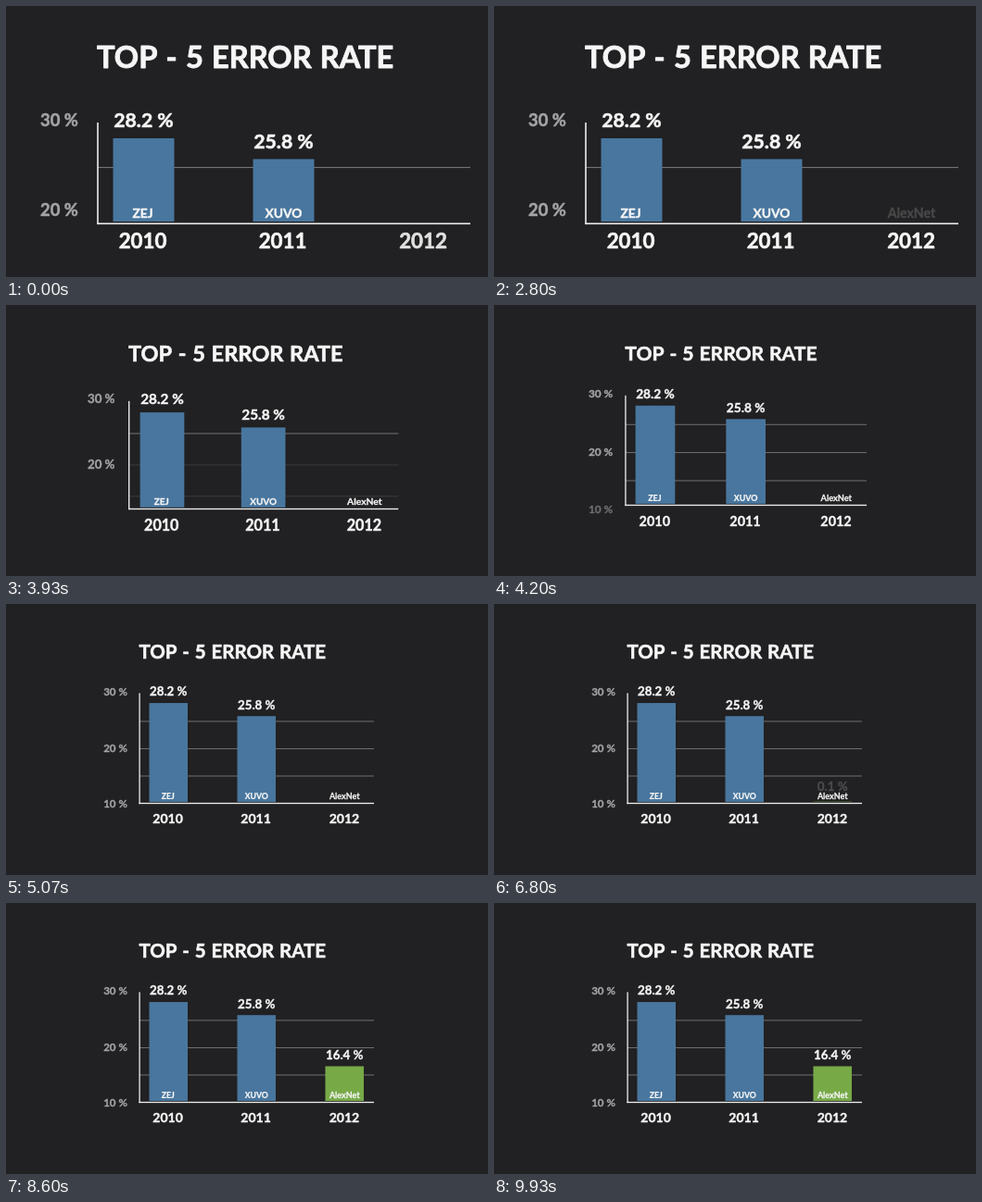
An HTML page with a canvas for the animation above (9990 ms loop, 520 by 293 pixels).

```html
<!DOCTYPE html>
<html lang="en">
<head>
<meta charset="utf-8">
<title>Top-5 error rate</title>
<style>
  html, body { margin: 0; width: 100%; height: 100%; overflow: hidden; background: #212022; }
  canvas { display: block; width: 520px; height: 293px; }
</style>
</head>
<body>
<canvas id="stage"></canvas>
<script>
const W = 520, H = 293, LOOP = 9990;
const BACK = '#212022', WHITE = '#f6f6f6', GREY = '#a4a4a6', LINE = '#7e7d80', BLUE = '#48769e', GREEN = '#77aa47';
const END_SCALE = 0.629, FIX_X = 220.6, FIX_Y = 46.1;

const canvas = document.getElementById('stage');
const ctx = canvas.getContext('2d');
const dpr = window.devicePixelRatio || 1;
canvas.width = Math.round(W * dpr);
canvas.height = Math.round(H * dpr);

const lerp = (a, b, p) => a + (b - a) * p;
const ramp = (t, a, b) => Math.min(1, Math.max(0, (t - a) / (b - a)));
const smooth = p => p * p * (3 - 2 * p);

// Cubic bezier easing with handles (x1, 0) and (x2, 1).
function bezier(x, x1, x2) {
  let lo = 0, hi = 1;
  for (let i = 0; i < 24; i++) {
    const u = (lo + hi) / 2, v = 1 - u;
    if (3 * x1 * u * v * v + 3 * x2 * u * u * v + u * u * u < x) lo = u;
    else hi = u;
  }
  return smooth(lo);
}

const blend = (from, to, p) => '#' + [1, 3, 5].map(i => {
  const [a, b] = [from, to].map(c => parseInt(c.slice(i, i + 2), 16));
  return Math.round(lerp(a, b, p)).toString(16).padStart(2, '0');
}).join('');

// Bold text, thickened by a thin outline; fading mixes it with the backdrop.
function text(str, x, y, size, color = WHITE, alpha = 1) {
  if (alpha <= 0) return;
  ctx.font = `700 ${size}px Lato, "Open Sans", sans-serif`;
  ctx.fillStyle = ctx.strokeStyle = blend(BACK, color, alpha);
  ctx.lineWidth = size * 0.028;
  ctx.lineJoin = 'round';
  ctx.fillText(str, x, y + size * 0.36);
  ctx.strokeText(str, x, y + size * 0.36);
}

function box(x1, y1, x2, y2, color, alpha = 1) {
  ctx.globalAlpha = alpha;
  ctx.fillStyle = color;
  ctx.fillRect(x1, y1, x2 - x1, y2 - y1);
  ctx.globalAlpha = 1;
}

function draw(t) {
  const zoom = bezier(ramp(t, 3560, 4500), 0.32, 0.05);
  const s = lerp(1, END_SCALE, zoom);
  const X = x => FIX_X + s * (x - FIX_X);
  const Y = y => FIX_Y + s * (y - FIX_Y);

  // The base of the chart slides on its own, while the rest zooms.
  const axisY = lerp(235.3, 215.5, zoom);
  const barBase = lerp(233, 214, zoom);
  const nameY = lerp(224, 208, zoom);
  const yearY = lerp(254, 232.3, zoom);
  const bar = (cx, top, color) => box(X(cx - 33), top, X(cx + 33), barBase, color);

  ctx.setTransform(dpr, 0, 0, dpr, 0, 0);
  ctx.textAlign = 'center';
  ctx.textBaseline = 'alphabetic';
  box(0, 0, W, H, BACK);

  ctx.wordSpacing = `${1.3 * s}px`;
  text('TOP - 5 ERROR RATE', X(258.2), Y(55.4), 32.6 * s);
  ctx.wordSpacing = '0px';

  const gridFade = ramp(t, 3840, 4130);
  const half = lerp(0.5, 0.42, zoom);
  [[174.6, 1], [221.6, gridFade], [268.5, gridFade]].forEach(([y, alpha]) => {
    box(X(99), Y(y) - half, X(501), Y(y) + half, LINE, alpha);
  });

  const scaleFade = ramp(t, 3950, 4380);
  [['30 %', 123, 1], ['20 %', 220.6, 1], ['10 %', 316.2, scaleFade]].forEach(([str, y, alpha]) => {
    text(str, X(57.5), Y(y), 18.4 * s, GREY, alpha);
  });

  bar(148.5, Y(143), BLUE);
  bar(299.5, Y(165.5), BLUE);

  const grow = smooth(ramp(t, 6750, 7700));
  if (grow > 0) bar(450.5, barBase - 37.5 * grow, GREEN);

  const line = lerp(1.6, 1.3, zoom) / 2;
  box(X(99) - line, Y(126), X(99) + line, axisY + line, '#eeeeee');
  box(X(99) - line, axisY - line, X(501), axisY + line, '#eeeeee');

  text('28.2 %', X(148.5), Y(123), 21.2 * s);
  text('25.8 %', X(299.5), Y(146), 21.2 * s);
  text((16.4 * grow).toFixed(1) + ' %', X(450.5), lerp(197.7, 164.6, grow), 21.2 * s,
    WHITE, ramp(t, 6750, 7000));

  text('ZEJ', X(147.5), nameY, 13.8 * s);
  text('XUVO', X(299.5), nameY, 13.8 * s);
  text('AlexNet', X(450.5), nameY, 14.2 * s, WHITE, ramp(t, 2710, 3200));

  text('2010', X(147.5), yearY, 22.3 * s);
  text('2011', X(298.5), yearY, 22.3 * s);
  text('2012', X(450), yearY, 22.3 * s, WHITE, lerp(0.9, 1, ramp(t, 0, 500)));
}

const start = performance.now();
function tick() {
  draw((performance.now() - start) % LOOP);
  requestAnimationFrame(tick);
}
tick();
</script>
</body>
</html>
```
